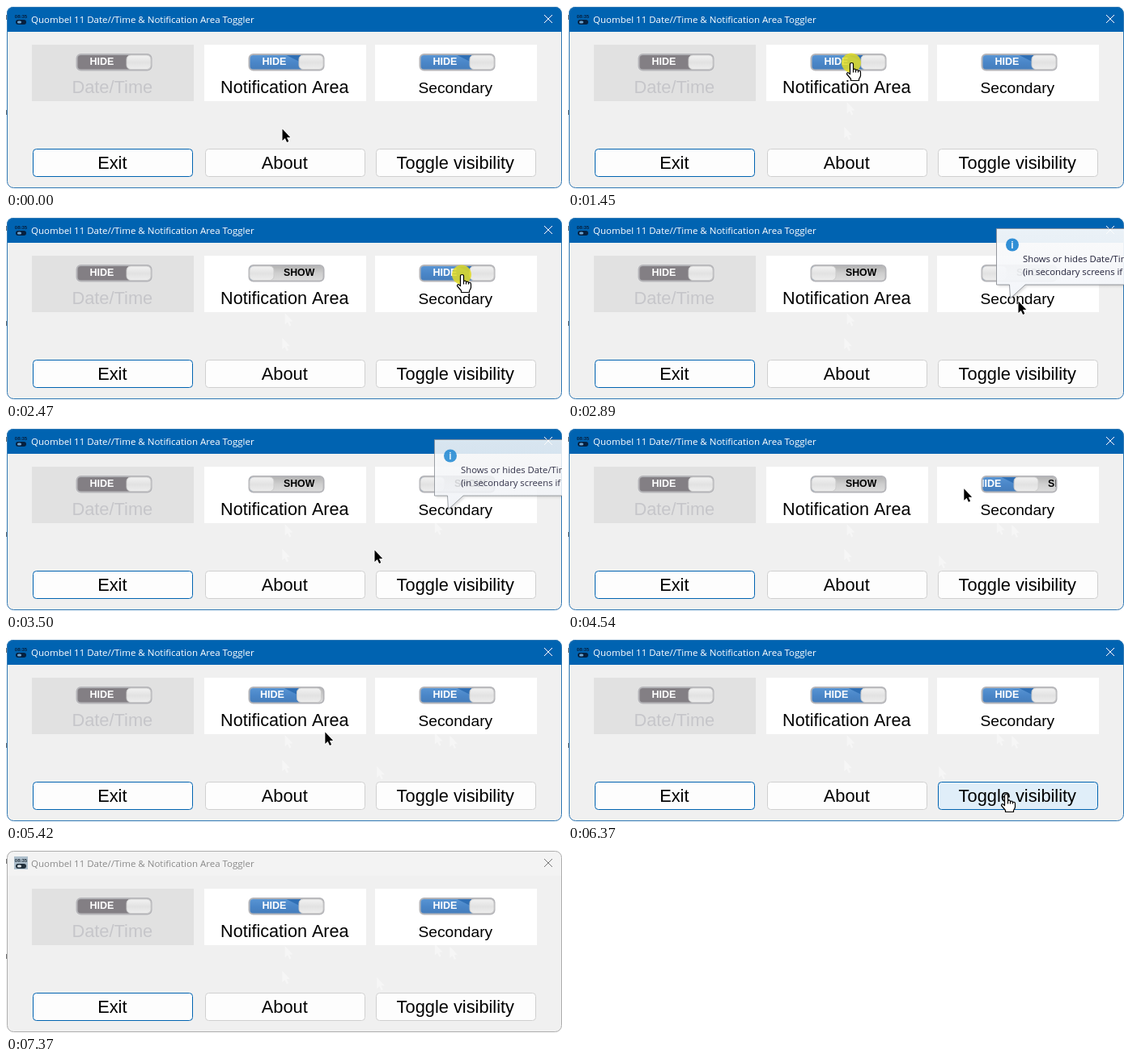
These frames come from a looping animation (687x227 px, 7.44 s). An HTML page with a canvas:

```html
<!DOCTYPE html>
<html lang="en">
<head>
<meta charset="utf-8">
<title>Toggler</title>
<style>
html, body { margin: 0; width: 100%; height: 100%; overflow: hidden; background: #fff; }
canvas { display: block; }
</style>
</head>
<body>
<canvas id="stage" width="687" height="227"></canvas>
<script>
const g = document.getElementById('stage').getContext('2d');
const LOOP = 7440;
const UI = '"Open Sans", "Noto Sans", sans-serif';
const ARIAL = '"Liberation Sans", Arial, sans-serif';
const ACCENT = '#0063b1';

const arrow = new Path2D('M0 0V14.5L3.3 11.5L5.6 16.5L7.8 15.5L5.5 10.6H9.8Z');
const hand = new Path2D('M-2 2Q-2 0 0 0Q2 0 2 2V8Q5 7 5 9Q8 8 8 10Q11 9 11 12V16Q10.5 18 9 20V22H-1V20L-6 14Q-6 11 -3 13L-2 14Z');

const home = { x: 341, y: 152 };
const first = { x: 350, y: 70 };
const second = { x: 563, y: 71 };

// pointer glides; sag bends the path downwards
const glides = [
  { at: 270, ms: 690, to: first },
  { at: 1650, ms: 480, to: second },
  { at: 2680, ms: 210, to: { x: 556, y: 104 } },
  { at: 3290, ms: 210, to: { x: 455, y: 151 } },
  { at: 3500, ms: 690, to: second, sag: 80 },
  { at: 4360, ms: 430, to: { x: 369, y: 61 }, sag: 8 },
  { at: 5290, ms: 270, to: { x: 421, y: 174 } },
  { at: 5890, ms: 480, to: { x: 541, y: 192 }, sag: 25 },
  { at: 6900, ms: 70, to: { x: 541, y: 230 } }
];
const flips = { first: [1580, 5210], second: [2510, 4400] };
const SLIDE = 220, GLOW = 130, PRINT_GAP = 230;

const ramp = (t, at, ms) => Math.min(1, Math.max(0, (t - at) / ms));
const ease = k => k * k * (3 - 2 * k);
const inside = (p, x, y, w, h) => p.x >= x && p.x < x + w && p.y >= y && p.y < y + h;
const slide = (t, [on, off]) => ramp(t, on, SLIDE) - ramp(t, off, SLIDE);

function pointer(t) {
  let p = home;
  for (const { at, ms, to, sag = 0 } of glides) {
    if (t < at) break;
    const k = ease(ramp(t, at, ms));
    p = {
      x: p.x + (to.x - p.x) * k,
      y: p.y + (to.y - p.y) * k + 4 * sag * k * (1 - k)
    };
  }
  return p;
}

function rect(x, y, w, h, fill) {
  g.fillStyle = fill;
  g.fillRect(x, y, w, h);
}

function round(x, y, w, h, r, fill, line, width = 1) {
  g.beginPath();
  g.roundRect(x, y, w, h, r);
  if (fill) { g.fillStyle = fill; g.fill(); }
  if (line) { g.strokeStyle = line; g.lineWidth = width; g.stroke(); }
}

function disc(x, y, r, fill) {
  g.beginPath();
  g.arc(x, y, r, 0, 7);
  g.fillStyle = fill;
  g.fill();
}

function label(str, x, y, font, fill, align = 'left') {
  g.font = font;
  g.fillStyle = fill;
  g.textAlign = align;
  g.fillText(str, x, y);
}

function shade(y, h, ...colors) {
  const s = g.createLinearGradient(0, y, 0, y + h);
  colors.forEach((c, i) => s.addColorStop(i / (colors.length - 1), c));
  return s;
}

function icon(active) {
  const ink = active ? '#06203f' : '#22303c';
  if (!active) rect(10, 8, 17, 16, '#aebfcc');
  label('08:35', 18.5, 15, 'bold 6px ' + ARIAL, ink, 'center');
  round(12, 17, 13, 6, 3, ink);
  round(14, 18.5, 5, 3, 1.5, active ? '#6fa5d0' : '#dfe6ea');
}

function frame(active) {
  rect(0, 0, 687, 227, '#fff');
  for (const y of [11, 129]) rect(0, y, 1, 6, '#777');
  g.save();
  g.beginPath();
  g.roundRect(1, 1, 685.5, 225, 8);
  g.clip();
  rect(0, 0, 687, 227, '#f0f0f0');
  rect(0, 0, 687, 32, active ? ACCENT : '#f3f3f3');
  g.restore();
  round(1.5, 1.5, 685, 224, 8, null, active ? '#2f78b4' : '#adadad');
  icon(active);
  label('Quombel 11 Date//Time & Notification Area Toggler', 31, 20.5, '11.5px ' + UI, active ? '#fff' : '#8a8a8a');
  g.strokeStyle = active ? '#fff' : '#777';
  g.lineWidth = 1;
  g.beginPath();
  g.moveTo(665, 11); g.lineTo(675, 21);
  g.moveTo(675, 11); g.lineTo(665, 21);
  g.stroke();
}

function toggle(x, p, enabled) {
  const knob = x + 62 - 61 * p;
  round(x + 1, 60, 92, 19.5, 5, '#c4c4c6', '#b4b4b8', 2);
  g.save();
  g.beginPath();
  g.roundRect(x + 2, 61, 90, 17.5, 4);
  g.clip();
  rect(knob - 62, 60, 70, 20, enabled ? shade(60, 20, '#5a96d4', '#4a86c8', '#447cba') : '#837f84');
  if (enabled) {
    g.beginPath();
    g.moveTo(knob - 15, 61);
    g.lineTo(knob + 3, 61);
    g.lineTo(knob + 1, 69);
    g.fillStyle = '#2f6fb5';
    g.fill();
  }
  rect(knob + 24, 60, 70, 20, shade(60, 20, '#b2b2b2', '#cfcfcf', '#dedede'));
  label('HIDE', knob - 45, 73, 'bold 12.5px ' + ARIAL, '#fff');
  label('SHOW', knob + 42.5, 73, 'bold 12.3px ' + ARIAL, '#000');
  g.restore();
  round(knob + 0.5, 61, 30, 17.5, 5, shade(61, 18, '#f2f2f2', '#e2e2e2', '#eeeeee'), '#cbcbcb');
}

function panel(x, name, size, p, enabled = true) {
  rect(x, 48, 200, 70, enabled ? '#fff' : '#e1e1e1');
  toggle(x + 54.5, p, enabled);
  label(name, x + 99.3, 108, size + 'px ' + ARIAL, enabled ? '#000' : '#c6c6ca', 'center');
}

function button(x, name, hot, focus) {
  round(x + 0.5, 177.5, 197, 34, 4, hot ? '#e0eef9' : '#fdfdfd', hot || focus ? ACCENT : '#d0d0d0');
  label(name, x + 98.3, 202, '21.8px ' + ARIAL, '#000', 'center');
}

function balloon(alpha) {
  if (alpha <= 0) return;
  g.save();
  g.globalAlpha = alpha;
  g.beginPath();
  g.moveTo(700, 14.5);
  g.lineTo(529.5, 14.5);
  g.lineTo(529.5, 84);
  g.lineTo(545.5, 84);
  g.lineTo(546.5, 101);
  g.lineTo(565, 84);
  g.lineTo(700, 84);
  g.shadowColor = 'rgba(0,0,0,.15)';
  g.shadowBlur = 3;
  g.shadowOffsetX = g.shadowOffsetY = 2;
  g.fillStyle = shade(14, 87, '#ffffff', '#f4f7fc');
  g.fill();
  g.shadowColor = 'transparent';
  g.strokeStyle = '#8c9096';
  g.lineWidth = 1;
  g.stroke();
  disc(549, 34.5, 8, '#1e86d2');
  label('i', 549, 39, 'bold 12px ' + ARIAL, '#fff', 'center');
  label('Shows or hides Date/Time', 562, 56, '11.3px ' + UI, '#10102a');
  label('(in secondary screens if any)', 562, 71.5, '11.3px ' + UI, '#10102a');
  g.restore();
}

function drawPointer(p, hot) {
  g.save();
  g.translate(p.x + 0.5, p.y + 0.5);
  g.lineJoin = 'round';
  if (hot) {
    g.fillStyle = '#fff';
    g.strokeStyle = '#000';
    g.lineWidth = 1.2;
    g.fill(hand);
    g.stroke(hand);
    g.beginPath();
    for (const x of [2, 5, 8]) { g.moveTo(x, 8 + x / 4); g.lineTo(x, 12); }
    g.stroke();
  } else {
    g.strokeStyle = '#fff';
    g.lineWidth = 1.6;
    g.stroke(arrow);
    g.fillStyle = '#000';
    g.fill(arrow);
  }
  g.restore();
}

// faint prints left along each glide
function drawPrints(t) {
  g.fillStyle = 'rgba(255,255,255,.4)';
  for (const { at, ms } of glides) {
    for (let s = at + 70; s < Math.min(t, at + ms); s += PRINT_GAP) {
      const p = pointer(s);
      if (p.y < 104 || p.y > 160) continue;
      g.save();
      g.translate(p.x, p.y);
      g.fill(arrow);
      g.restore();
    }
  }
}

function draw(t) {
  const p = pointer(t);
  const shown = t < 6970;
  const overToggle = [299, 511].some(x => inside(p, x, 59, 94, 22));
  const overButton = shown && inside(p, 457, 177, 198, 35);
  const glowing = Object.values(flips).flat().some(at => t >= at - GLOW && t < at);

  frame(t < 7370);
  panel(32, 'Date/Time', 21.8, 0, false);
  panel(245, 'Notification Area', 21.6, slide(t, flips.first));
  panel(456, 'Secondary', 19.2, slide(t, flips.second));
  drawPrints(t);
  button(33, 'Exit', false, true);
  button(246, 'About', false);
  button(457, 'Toggle visibility', overButton);
  balloon(0.92 * (ramp(t, 2680, 140) - ramp(t, 3460, 520)));
  if (glowing) disc(p.x, p.y + 0.5, 12, 'rgba(226,220,36,.85)');
  if (shown) drawPointer(p, overToggle || overButton);
}

const start = performance.now();
function tick() {
  draw((performance.now() - start) % LOOP);
  requestAnimationFrame(tick);
}
tick();
</script>
</body>
</html>
```
